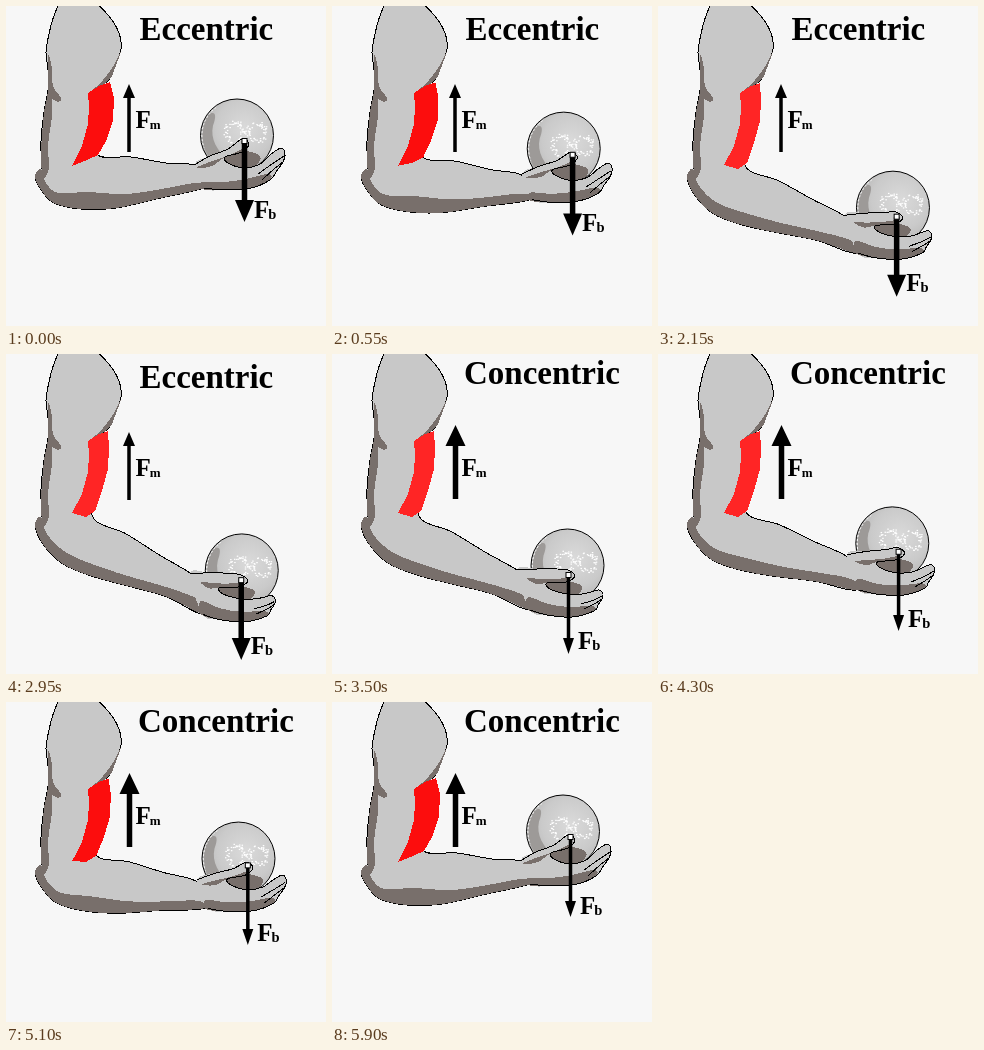
These frames come from a looping animation (320 px wide and 320 px high, 6450 ms). An HTML page:

```html
<!DOCTYPE html>
<html lang="en">
<head>
<meta charset="utf-8">
<title>Eccentric and concentric contraction</title>
<style>
  html, body { margin: 0; width: 100%; height: 100%; overflow: hidden; background: #f7f7f7; }
  svg { display: block; width: 100vw; height: 100vh; }
  text { font: bold 25px "Liberation Serif", "Times New Roman", serif; }
  .title { font-size: 33px; }
  .art { shape-rendering: crispEdges; }
  .skin { fill: #c8c8c8; }
  .shade { fill: #786f6b; }
  .line { fill: none; stroke: #000; stroke-width: 1; }
</style>
</head>
<body>
<svg viewBox="0 0 320 320">
  <defs>
    <radialGradient id="shine" cx=".6" cy=".4" r=".65">
      <stop offset="0" stop-color="#dadada"/>
      <stop offset=".6" stop-color="#cacaca"/>
      <stop offset="1" stop-color="#b4b3b2"/>
    </radialGradient>
  </defs>

  <g class="art">
    <path id="body" class="skin" stroke="#000"/>
    <path id="armShade" class="shade"/>
    <path id="backShade" class="shade"/>
    <path id="capShade" class="shade"/>
    <path id="muscle"/>
  </g>

  <g id="ball">
    <circle r="36.5" fill="url(#shine)" stroke="#000"/>
    <path d="M-29-21C-20-26-21-18-24-10C-27 4-20 14-8 27L-12 34C-31 27-42 2-29-21Z" fill="#9d9a98"/>
    <path d="M-21-28A35 35 0 0 0-33 12" fill="none" stroke="#fff" stroke-dasharray="2 2"/>
    <g id="specks" fill="#fff"></g>
  </g>

  <g id="hand" class="art">
    <path id="hollow" class="shade"/>
    <path id="palm" class="skin"/>
    <path id="palmShade" class="shade"/>
    <path id="thumbShade" class="shade"/>
    <path id="palmLine" class="line"/>
    <path id="finger1" class="line"/>
    <path id="finger2" class="line"/>
  </g>

  <path id="pull"/>
  <path id="load"/>
  <rect id="dot" width="5" height="5" fill="#fff" stroke="#000"/>
  <text x="129.500" y="122">F<tspan font-size="13" dy="1" dx="-1">m</tspan></text>
  <text id="loadText">F<tspan font-size="14.500" dy="1" dx="-1">b</tspan></text>
  <text id="title" class="title"></text>
</svg>

<script>
const el = id => document.getElementById(id);
const set = (id, attrs) => {
  for (const k in attrs) el(id).setAttribute(k, attrs[k]);
};

// Each point is "x,y" or "x,y,dx,dy"; the offset is reached with the arm fully lowered.
const parse = s => s.trim().split(/\s+/).map(p => p.split(',').map(Number));
const elbow = '29,171 36,185,1,5 48,197,8,12 75,203,10,18 110,202,10,28 150,193,10,47 198,182,0,74';
const underside = '264,174,-2,83 245,182,-5,81 218,184,-3,77';

const shapes = {
  body: parse(`57,-4 48,10 43,28 40,46 42,64 42,84 38,106 35,135 35,163 ${elbow}
    208,172,0,62 188,159,-3,57 160,157,-7,41 125,151,-5,27 92,149,-5,13
    91,120 94,84 103,74 108,62 115,43 113,27 102,9 86,-4`),
  armShade: parse(`35,163 ${elbow} 190,177,5,66 150,184,12,47 118,188,10,34
    80,186,12,25 52,187,8,11 40,177,1,3`),
  backShade: parse(`42,50 46,62 47,80 55,92 52,96 46,94 46,110 42,140 43,162 37,172
    35,150 36,130 38,106 42,84`),
  capShade: parse('115,45 109,62 103,74 83,88 97,74 108,59'),
  hollow: parse('219,150,-4,78 238,145,-3,82 254,150,-4,82 250,160,-4,80 238,164,-3,78 223,159,-4,78'),
  palm: parse(`188,159,-3,57 204,150,1,65 222,143,3,72 236,133,0,83 243,138,0,84
    236,146,-2,82 219,151,-4,78 222,157,-4,78 238,162,-3,78 254,158,-4,82
    264,149,-5,89 275,142,-8,94 279,148,-8,92 277,156,-7,89 270,166,-4,85
    ${underside} 198,182,0,74`),
  palmShade: parse(`196,176,0,67 218,176,-2,74 240,173,-3,80 262,168,-2,84 ${underside} 196,183,0,73`),
  thumbShade: parse('190,162,5,62 206,155,2,70 224,149,-1,76 238,142,0,82 236,146,-2,82 219,151,-4,78 206,160,-2,70'),
  finger1: parse('252,168,-3,82 266,158,-4,88 278,150,-8,92'),
  finger2: parse('256,174,-4,81 268,163,-4,86 277,156,-7,89')
};
shapes.palmLine = shapes.palm;
const open = ['palmLine', 'finger1', 'finger2'];

const muscle = parse(`82,87 93,80 104,76,-2,1 108,92,-5,2 107,115,-5,0 100,135,-4,2
  92,149,-3,8 81,154,-1,9 66,160,0,-1 76,140 82,118 83,100`);

const blend = (pts, w) => pts.map(([x, y, dx = 0, dy = 0]) => [x + dx * w, y + dy * w]);
const polygon = pts => 'M' + pts.join('L') + 'Z';

function curve(pts, closed) {
  const n = pts.length;
  const at = i => closed ? pts[(i + n) % n] : pts[Math.max(0, Math.min(n - 1, i))];
  let d = 'M' + pts[0];
  for (let i = 0; i < (closed ? n : n - 1); i++) {
    const [a, b, c, e] = [at(i - 1), at(i), at(i + 1), at(i + 2)];
    const c1 = b.map((v, k) => v + (c[k] - a[k]) / 6);
    const c2 = c.map((v, k) => v - (e[k] - b[k]) / 6);
    d += `C${c1} ${c2} ${c}`;
  }
  return d + (closed ? 'Z' : '');
}

// Arrow from y0 to y1 with shaft width s and a head of the given half width and length
function arrow(x, y0, y1, s, half, len) {
  const neck = y1 - Math.sign(y1 - y0) * len;
  const h = s / 2;
  return polygon([[x - h, y0], [x - h, neck], [x - half, neck], [x, y1],
    [x + half, neck], [x + h, neck], [x + h, y0]]);
}

function addSpecks() {
  let seed = 11;
  const rnd = () => (seed = seed * 16807 % 2147483647) / 2147483647;
  let out = '';
  for (let i = 0; i < 110; i++) {
    const a = rnd() * Math.PI * 2, r = 6 + rnd() * 5;
    const x = (i % 2 ? 19 : -3) + Math.cos(a) * r;
    const y = -4 + Math.sin(a) * r * 1.1;
    out += `<rect x="${x.toFixed(1)}" y="${y.toFixed(1)}" width="1.5" height="1.2"/>`;
  }
  el('specks').innerHTML = out;
}

const drop = [0, .16, .33, .53, .73, .88, 1, 1.06];
const LOOP = 6450, TURN = 3500, HOLD = 550, STEP = 400;

function poseAt(t) {
  if (t < TURN) return t < HOLD ? 0 : Math.min(7, 1 + Math.floor((t - HOLD) / STEP));
  return Math.max(0, 6 - Math.floor((t - TURN) / STEP));
}

function draw(pose, lowering) {
  const w = drop[pose];
  const sway = 18 * w * (1 - w);
  const x = 238.5 - 2 * w + sway;
  const y = 135 + 86 * w;
  const tip = 215 + 85 * w;

  for (const id in shapes) {
    set(id, { d: curve(blend(shapes[id], w), !open.includes(id)) });
  }
  set('muscle', {
    d: polygon(blend(muscle, Math.min(1, w / .53))),
    fill: pose < 3 ? '#fc0d0d' : '#ff2525'
  });
  set('hand', { transform: `translate(${sway} 0)` });
  set('ball', { transform: `translate(${231 + 4.5 * w} ${129.5 + 82 * w})` });
  set('dot', { x: x - 2.5, y: y - 2.5 });
  set('load', { d: lowering ? arrow(x, y, tip + 1, 5.5, 9.5, 22) : arrow(x, y, tip, 3.5, 5.5, 16) });
  set('pull', { d: lowering ? arrow(123, 146, 78, 3.5, 6, 14) : arrow(123.5, 145, 71, 5.5, 10, 21) });
  set('loadText', { x: x + 9.5, y: 212 + 83 * w });
  set('title', { x: lowering ? 133.5 : 132, y: lowering ? 34 : 30 });
  el('title').textContent = lowering ? 'Eccentric' : 'Concentric';
}

let last = '';
function tick() {
  const t = performance.now() % LOOP;
  const pose = poseAt(t), lowering = t < TURN;
  const key = pose + '-' + lowering;
  if (key !== last) draw(pose, lowering);
  last = key;
  requestAnimationFrame(tick);
}

addSpecks();
tick();
</script>
</body>
</html>
```
